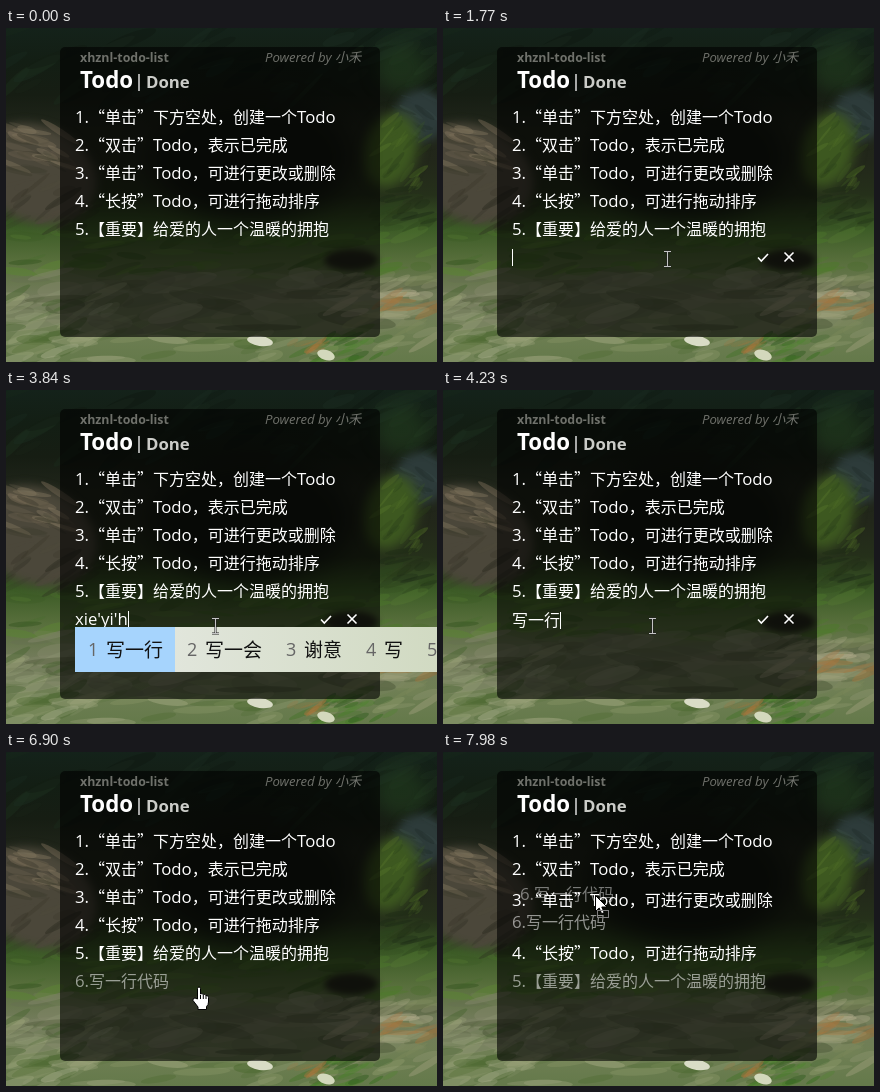
These frames come from a looping animation (431x334 px, 8000 ms). An HTML page with a canvas:

```html
<!DOCTYPE html>
<html lang="zh-CN">
<head>
<meta charset="utf-8">
<title>Todo list</title>
<style>
html, body { margin: 0; width: 100%; height: 100%; overflow: hidden; background: #16221a; }
canvas { display: block; width: 431px; height: 334px; }
</style>
</head>
<body>
<canvas id="stage"></canvas>
<script>
const W = 431, H = 334, LOOP = 8000;
const LATIN = '"Open Sans", "Noto Sans", sans-serif';
const CJK = '"Noto Sans CJK SC", "Noto Sans CJK", sans-serif';
const dpr = window.devicePixelRatio || 1;
const canvas = document.getElementById('stage');
const backdrop = document.createElement('canvas');
for (const c of [canvas, backdrop]) { c.width = W * dpr; c.height = H * dpr; }
const ctx = canvas.getContext('2d');

// ---------- painted backdrop ----------
function paintBackdrop() {
  const g = backdrop.getContext('2d');
  g.scale(dpr, dpr);
  let seed = 11;
  const rnd = () => (seed = (seed * 16807) % 2147483647) / 2147483647;
  const between = (a, b) => a + (b - a) * rnd();

  const base = g.createLinearGradient(0, 0, 0, H);
  ['#14221a', '#131e14', '#161d13', '#20251a', '#22271a', '#25301a', '#3c5b26', '#586f3c', '#727b5a', '#6f7f54', '#64794a']
    .forEach((color, i, all) => base.addColorStop(i / (all.length - 1), color));
  g.fillStyle = base;
  g.fillRect(0, 0, W, H);

  function blob(color, x, y, rx, ry, tilt = 0, blur = 0) {
    g.filter = blur ? `blur(${blur}px)` : 'none';
    g.fillStyle = color;
    g.beginPath();
    g.ellipse(x, y, rx, ry, tilt, 0, 7);
    g.fill();
    g.filter = 'none';
  }
  function brush(n, x0, y0, x1, y1, len, tilt, colors) {
    colors = colors.split(' ');
    for (let i = 0; i < n; i++) {
      g.globalAlpha = between(0.15, 0.55);
      blob(colors[i % colors.length], between(x0, x1), between(y0, y1),
        len * between(0.4, 1), len * between(0.07, 0.2), tilt + between(-0.3, 0.3));
    }
    g.globalAlpha = 1;
  }

  // forest, with the leafy gap and the cool boulder on the right
  brush(50, 0, 0, W, 70, 32, -0.5, '#1b2c20 #101912 #1d2f1e');
  blob('#24402088', 395, 40, 26, 24, 0, 8);
  blob('#2d3b3a', 415, 88, 26, 26, 0.4, 4);
  brush(14, 395, 68, W, 112, 14, 0.5, '#384846 #232f2c');
  blob('#3d5820', 385, 122, 26, 38, 0.3, 6);
  brush(26, 372, 90, 420, 160, 14, -0.8, '#526f28 #2b401a #405c22');
  brush(20, 372, 160, W, 200, 20, -0.3, '#1d2a16 #2c421c');

  // pale rock on the left
  blob('#4b473a', 30, 146, 62, 48, 0.4, 5);
  brush(30, 0, 98, 62, 150, 24, 0.35, '#82765f #6d634f #3a382b');
  brush(24, 0, 150, 90, 205, 22, -0.5, '#4c493b #2a2a1f #353226');
  blob('#11160f', 245, 130, 100, 62, 0, 14);

  // grass, worn path and the front meadow
  brush(70, 0, 204, W, 248, 26, -0.15, '#4d7a2a #375721 #5c8434 #446c26');
  blob('#26291b', 345, 232, 27, 11, 0, 3);
  brush(80, 0, 246, W, 300, 44, -0.05, '#828669 #666f50 #8d9474 #505a3b');
  brush(34, 0, 262, 110, H, 26, -0.35, '#98a077 #4b6632 #a2aa86');
  brush(34, 330, 250, W, 312, 26, -0.25, '#9a9c78 #7f8b5c #b2ad8c');
  brush(26, 0, 304, W, H, 30, -0.15, '#8b9868 #4d6a30 #a0a67f');
  brush(22, 290, 308, 385, H, 18, -0.4, '#3a6f20 #2f5c1e #4d842c');
  brush(8, 380, 268, W, 282, 22, -0.3, '#a8743c');
  brush(8, 278, 312, 316, 326, 14, -0.5, '#a8743c');
  blob('#d9dcc6', 254, 313, 13, 5, 0.15);
  blob('#d3d8bc', 320, 327, 9, 5, 0.3);

  g.fillStyle = 'rgba(0,0,0,.6)';
  g.beginPath();
  g.roundRect(54, 19, 320, 290, 5);
  g.fill();
}

// ---------- drawing helpers ----------
// Latin and CJK runs use separate fonts so that Chinese quotes stay full width.
function text(str, x, y, { size = 16, latin = size, style = '500', color = '#fff', alpha = 1 } = {}) {
  ctx.globalAlpha = alpha;
  ctx.fillStyle = color;
  for (const run of str.match(/[ -~]+|[^ -~]+/g) || []) {
    ctx.font = /[ -~]/.test(run[0]) ? `${style} ${latin}px ${LATIN}` : `${style} ${size}px ${CJK}`;
    ctx.fillText(run, x, y);
    x += ctx.measureText(run).width;
  }
  ctx.globalAlpha = 1;
  return x;
}

function line(color, width, ...p) {
  ctx.strokeStyle = color;
  ctx.lineWidth = width;
  ctx.beginPath();
  for (let i = 0; i < p.length; i += 2) ctx.lineTo(p[i], p[i + 1]);
  ctx.stroke();
}

const progress = (t, from, to) => Math.max(0, Math.min(1, (t - from) / (to - from)));

// ---------- pointer ----------
const OPEN = 1770, SAVE = 6240, GRAB = 7320, ENTER = 240;
const GRIP = { x: 144, y: 232 };

// start, end, target x, target y, ease-out power
const MOVES = [
  [ENTER, 1020, 260, 134, 1.4],
  [1020, 1110, 251, 156, 1],
  [1110, 1620, 224, 231, 1.4],
  [1980, 2130, 213, 234, 1],
  [2430, 2550, 209, 236, 1],
  [6870, 7170, GRIP.x, GRIP.y, 2.5],
  [GRAB, 7710, 153, 189, 1],
  [7710, 7980, 152, 143, 1]
];

function pointerAt(t) {
  let x = 431, y = 46;
  for (const [from, to, tx, ty, power] of MOVES) {
    const p = 1 - (1 - progress(t, from, to)) ** power;
    x += (tx - x) * p;
    y += (ty - y) * p;
  }
  return [Math.round(x), Math.round(y)];
}

const ARROW = new Path2D('M.5 .5V16.5L4.2 13 6.6 18.7 9.2 17.6 6.8 12H12Z');
const HAND = new Path2D('M-1.5 12V1.5Q-1.5 0 0 0T1.5 1.5V7Q3 5.8 4.3 7.6 6 6.6 7 8.5 9.5 8 9.5 10.5V15Q9.5 18 7.5 19.5V22.5H-1V20L-6 13.5Q-6.5 11 -4 11Z');

function drawPointer(kind, x, y) {
  ctx.save();
  ctx.translate(x, y);
  if (kind === 'beam') {
    for (const [color, w] of [['#222', 2], ['#c4c4c4', 1]]) {
      line(color, w, 0.5, -7, 0.5, 7);
      for (const end of [-7.5, 7.5]) line(color, w, -3, end, 4, end);
    }
  } else {
    const path = kind === 'hand' ? HAND : ARROW;
    ctx.fillStyle = '#fff';
    ctx.strokeStyle = '#000';
    ctx.lineWidth = 1;
    ctx.fill(path);
    ctx.stroke(path);
    if (kind === 'hand') for (const k of [1.5, 4.3, 7]) line('#000', 1, k, 8, k, 12);
    if (kind === 'drag') {
      ctx.strokeStyle = '#fff';
      ctx.strokeRect(2.5, 15.5, 11, 7);
      ctx.setLineDash([1, 1]);
      ctx.strokeStyle = '#000';
      ctx.strokeRect(2.5, 15.5, 11, 7);
    }
  }
  ctx.restore();
}

// ---------- list ----------
const ITEMS = [
  '1.“单击”下方空处，创建一个Todo',
  '2.“双击”Todo，表示已完成',
  '3.“单击”Todo，可进行更改或删除',
  '4.“长按”Todo，可进行拖动排序',
  '5.【重要】给爱的人一个温暖的拥抱',
  '6.写一行代码'
];
const ROW = 28, TOP = 75, NEW = 5;
const rowText = { latin: 16.8 };

// rows make way one after another, from the last one up
const swapAt = i => 7555 + 206 * (NEW - 1 - i);
const makeWay = (i, t) => progress(t, swapAt(i), swapAt(i) + 150);

function hoveredRow(t, x, y) {
  if (t < ENTER || (t >= OPEN && t < SAVE)) return -1;
  if (t >= SAVE) return t < swapAt(NEW - 1) ? NEW : NEW - 1;
  const i = Math.floor((y - TOP) / ROW);
  return x > 68 && x < 352 && i >= 0 && i < NEW ? i : -1;
}

function drawList(t, hover) {
  let lift = 0;
  for (let i = 0; i < NEW; i++) lift += makeWay(i, t);
  ITEMS.forEach((item, i) => {
    if (i === NEW && t < SAVE) return;
    const slot = i === NEW ? NEW - lift : i + makeWay(i, t);
    const dim = i === hover || (i === NEW && t >= GRAB);
    text(item, 69, Math.round(TOP + 20 + ROW * slot), { ...rowText, alpha: dim ? 0.55 : 1 });
  });
}

// ---------- input and candidates ----------
// Each syllable has a start and a time per key.
const PHRASES = [
  { word: '写一行', commit: 4230, syllables: [['xie', 3030, 90], ['yi', 3630, 60], ['hang', 3840, 70]] },
  { word: '代码', commit: 4680, syllables: [['dai', 4380, 30], ['ma', 4470, 30]] }
];
const CANDIDATES = {
  'x': '下 先 想 小 向 行',
  'xie': '写 些 谢 鞋 斜 协',
  "xie'y": '写一 谢意 写 些 谢 鞋',
  "xie'yi'h": '写一行 写一会 谢意 写 些',
  'd': '的 都 到 大 但 多',
  'da': '大 打 达 答 搭 哒',
  'dai': '带 代 待 戴 呆 袋',
  "dai'm": '代码 带 代 待 戴'
};

function typedAt(t) {
  let done = '', letters = '';
  for (const { word, commit, syllables } of PHRASES) {
    if (t >= commit) done += word;
    else letters += syllables
      .filter(s => t >= s[1])
      .map(([keys, start, pace]) => keys.slice(0, 1 + Math.floor((t - start) / pace)))
      .join("'");
  }
  return { done, letters };
}

function drawCandidates(letters, left, top) {
  const height = 45;
  const fill = ctx.createLinearGradient(left, 0, W, 0);
  fill.addColorStop(0, '#e7eae5');
  fill.addColorStop(1, '#d1dac2');
  ctx.fillStyle = fill;
  ctx.fillRect(left, top, W - left, height);
  const key = Object.keys(CANDIDATES).filter(k => letters.startsWith(k)).pop();
  let x = left;
  CANDIDATES[key].split(' ').forEach((word, i) => {
    const w = 42 + 19 * word.length;
    if (!i) {
      ctx.fillStyle = '#a6d4fd';
      ctx.fillRect(x, top, w + 1, height);
    }
    text(String(i + 1), x + 13, top + 29, { size: 18, style: '', color: '#666' });
    text(word, x + 31, top + 30, { size: 19, style: '', color: '#111' });
    x += w;
  });
}

function drawInput(t) {
  const { done, letters } = typedAt(t);
  const drop = done ? 1 : 0;
  const left = text(done, 69, 235 + drop, rowText);
  const x = text(letters, left, 235 + drop, rowText);
  const since = t < 3030 ? t - OPEN : t - 4890;
  if (since < 0 || since % 1020 < 510) {
    ctx.fillStyle = '#fff';
    ctx.fillRect(Math.round(x), 221 + drop, 1, 17);
  }
  line('#fff', 1.6, 315, 229.5, 318.3, 233, 325, 226);
  line('#fff', 1.6, 341.5, 224.5, 350.5, 233.5);
  line('#fff', 1.6, 350.5, 224.5, 341.5, 233.5);
  if (letters) drawCandidates(letters, left, 237 + 2 * drop);
}

// ---------- frame ----------
function draw(t) {
  ctx.setTransform(1, 0, 0, 1, 0, 0);
  ctx.drawImage(backdrop, 0, 0);
  ctx.setTransform(dpr, 0, 0, dpr, 0, 0);

  text('xhznl-todo-list', 74, 34, { size: 12.4, style: 'bold', color: '#6f716b' });
  text('Powered by 小禾', 259, 34, { size: 13.2, style: 'italic', color: '#6f716b' });
  text('Todo', 74, 60, { size: 22.3, style: 'bold' });
  line('#ddd', 1.5, 133, 46, 133, 63);
  text('Done', 140, 60, { size: 16.8, style: 'bold', color: '#cbccc8' });

  const [x, y] = pointerAt(t);
  const hover = hoveredRow(t, x, y);
  const editing = t >= OPEN && t < SAVE;
  drawList(t, hover);
  if (editing) drawInput(t);
  if (t >= GRAB) text(ITEMS[NEW], 69 + x - GRIP.x, y + 5, { ...rowText, alpha: 0.45 });
  if (t >= ENTER) {
    const kind = editing ? 'beam' : t >= GRAB ? 'drag' : hover >= 0 ? 'hand' : 'arrow';
    drawPointer(kind, x, y);
  }
}

paintBackdrop();
const start = performance.now();
function tick() {
  draw((performance.now() - start) % LOOP);
  requestAnimationFrame(tick);
}
tick();
</script>
</body>
</html>
```
